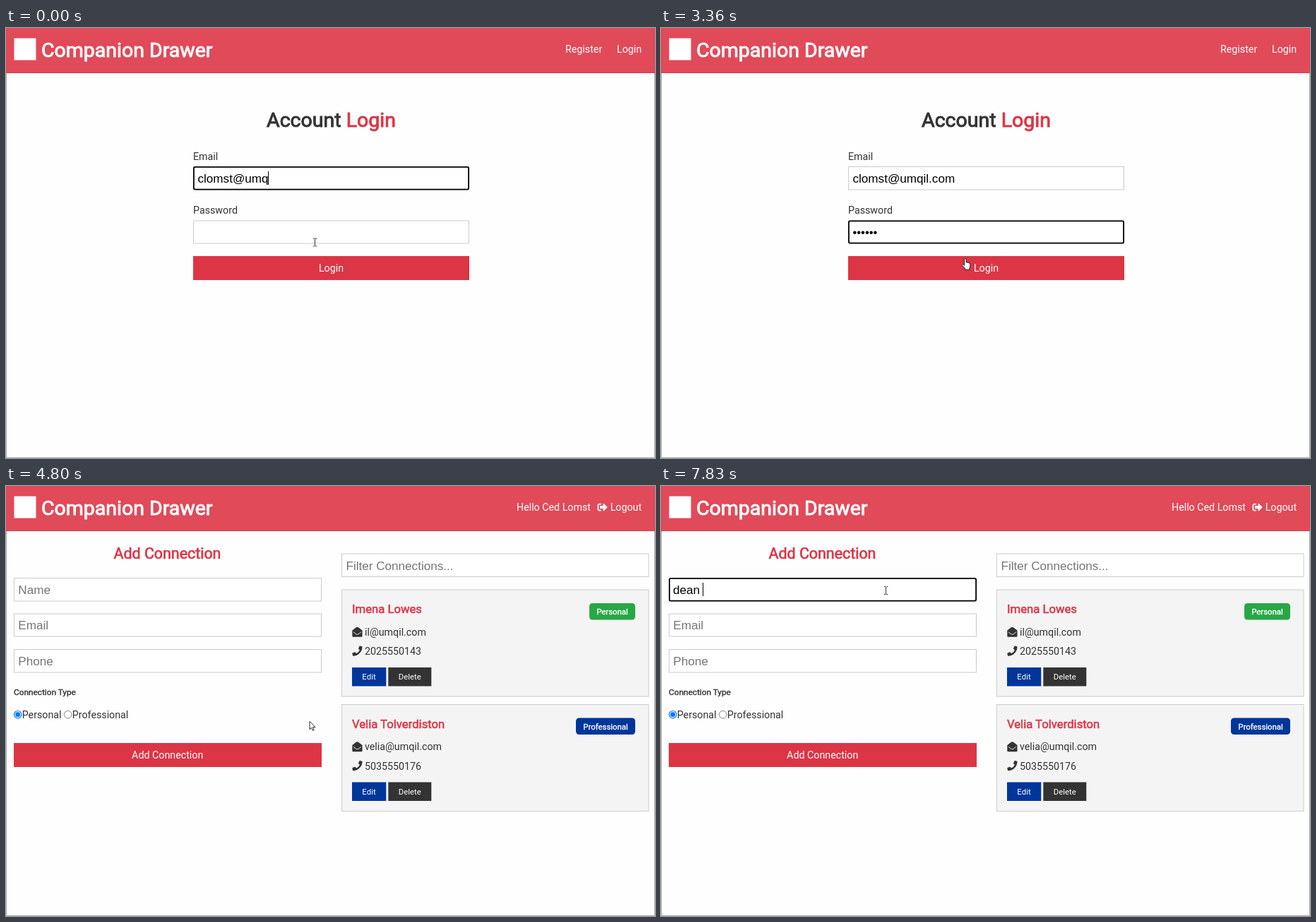
An HTML page that plays this animation: 919x609 px, repeating every 8 s.

```html
<!DOCTYPE html>
<html lang="en">
<head>
<meta charset="utf-8">
<title>Companion Drawer</title>
<style>
  html, body { margin: 0; width: 100%; height: 100%; overflow: hidden; background: #fefefe; }
  svg { display: block; width: 919px; height: 609px; }
  text { font: 14.25px Roboto, sans-serif; fill: currentColor; color: #333; white-space: pre; }
  .white { color: #fff; }
  .red { color: #dc3545; }
  .mid { text-anchor: middle; }
  .end { text-anchor: end; }
  .bold { stroke: currentColor; stroke-width: .033em; }
  .h1 { font-size: 28.5px; }
  .h2 { font-size: 21.4px; }
  .h3 { font-size: 16.7px; }
  .h5 { font-size: 11.83px; }
  .small { font-size: 11.4px; }
  .input { font: 17.1px "Liberation Sans", Arial, sans-serif; color: #000; }
  .hint { color: #757575; }
  .dots { font-size: 16.6px; }
  .cursor { fill: #fff; stroke: #111; stroke-width: .9; stroke-linejoin: round; }
</style>
</head>
<body>
<svg viewBox="0 0 919 609">
  <defs>
    <path id="phone" d="M493.4 24.6l-104-24c-11.3-2.6-22.9 3.3-27.5 13.9l-48 112c-4.2 9.8-1.4 21.3 6.9 28l60.6 49.6c-36 76.7-98.9 140.5-177.2 177.2l-49.6-60.6c-6.8-8.3-18.2-11.1-28-6.9l-112 48C3.9 366.5-2 378.1.6 389.4l24 104C27.1 504.2 36.7 512 48 512c256.1 0 464-207.5 464-464 0-11.2-7.7-20.9-18.6-23.4z"/>
    <g id="mail">
      <path d="M0 5.6Q0 5 .6 4.5L5.2 1Q7.1-.6 9 1l4.6 3.5q.6.5.6 1.1V13q0 1.2-1.2 1.2H1.2Q0 14.2 0 13z"/>
      <path d="M1.6 7.3l4 3q1.5 1 3 0l4-3" fill="none" stroke="#f4f4f4" stroke-width=".9"/>
    </g>
  </defs>

  <rect width="919" height="609" fill="#fefefe"/>
  <path d="M.5 64V608.5H918.5V64" fill="none" stroke="#a9a9a9"/>
  <rect width="919" height="64" fill="#e04a59"/>
  <rect y="63" width="919" height="1" fill="#d04654"/>
  <rect x="11.5" y="14.5" width="31" height="31" fill="#fff"/>
  <text class="h1 bold white" x="50" y="40.5">Companion Drawer</text>

  <g id="login">
    <text class="white" x="792" y="35">Register</text>
    <text class="white" x="865" y="35">Login</text>
    <text class="h1 bold mid" x="460.5" y="140">Account <tspan class="red">Login</tspan></text>
    <text x="265" y="186.5">Email</text>
    <text x="265" y="263">Password</text>
    <g id="loginFields"></g>
    <text class="input" id="email" x="271.5" y="219"></text>
    <text class="input dots" id="password" x="271.5" y="295"></text>
    <rect id="loginButton" x="265" y="323" width="391" height="34"/>
    <text class="white mid" x="460.5" y="345">Login</text>
  </g>

  <g id="home">
    <text class="white end" id="hello" x="828" y="35"></text>
    <path fill="#fff" transform="translate(837.5 23) scale(.0278)" d="M497 273L329 441c-15 15-41 4.5-41-17v-96H152c-13.3 0-24-10.7-24-24v-96c0-13.3 10.7-24 24-24h136V88c0-21.4 25.9-32 41-17l168 168c9.3 9.4 9.3 24.6 0 34zM192 436v-40c0-6.6-5.4-12-12-12H96c-17.7 0-32-14.3-32-32V160c0-17.7 14.3-32 32-32h84c6.6 0 12-5.4 12-12V76c0-6.6-5.4-12-12-12H96c-53 0-96 43-96 96v192c0 53 43 96 96 96h84c6.6 0 12-5.4 12-12z"/>
    <text class="white" x="855.7" y="35">Logout</text>
    <text class="h2 bold red mid" x="228.5" y="103">Add Connection</text>
    <g id="homeFields"></g>
    <text class="input hint" id="nameHint" x="17.3" y="153">Name</text>
    <text class="input" id="name" x="17" y="153"></text>
    <text class="input hint" x="17.3" y="203">Email</text>
    <text class="input hint" x="17.3" y="254">Phone</text>
    <text class="input hint" x="481.5" y="118.5">Filter Connections...</text>
    <text class="h5 bold" x="11" y="296">Connection Type</text>
    <circle cx="16.7" cy="323.7" r="5.2" fill="#fff" stroke="#0075ff" stroke-width="1.2"/>
    <circle cx="16.7" cy="323.7" r="3.4" fill="#0075ff"/>
    <text x="22.7" y="329">Personal</text>
    <circle cx="87.6" cy="323.7" r="5.3" fill="#fff" stroke="#767676" stroke-width=".9"/>
    <text x="93.8" y="329">Professional</text>
    <rect x="11" y="364" width="436" height="34" fill="#dc3545"/>
    <text class="white mid" x="228.7" y="386">Add Connection</text>
    <g id="spinner" transform="translate(692.7 236.5)"></g>
    <g id="cards"></g>
  </g>

  <rect id="ring" fill="none" stroke="#000" stroke-width="1.8" rx="2"/>
  <rect id="caret" width="1" height="19"/>
  <path id="beam" fill="none" stroke="#333" d="M-2.5-5.5h2M.5-5.5h2M0-5V5M-2.5 5.5h2M.5 5.5h2"/>
  <path id="hand" class="cursor" d="M4 10.5V1.8a1.3 1.3 0 0 1 2.6 0V6q1.3-.7 2 .4 1.2-.5 1.9.5 1.5-.4 1.8 1V11q0 2-1 3.2v2H5.2v-1.4L1.2 10.4Q.6 9 1.9 8.6q.9-.2 2.1 1.9z"/>
  <path id="arrow" class="cursor" d="M0 0V11.5L2.6 9 4.4 13 6.2 12.2 4.4 8.3H8z"/>
</svg>

<script>
const LOOP = 8000;
const $ = id => document.getElementById(id);
const show = (el, on) => { el.style.display = on ? '' : 'none'; };

const field = (x, y, w, h) =>
  `<rect x="${x + .5}" y="${y + .5}" width="${w - 1}" height="${h - 1}" fill="#fff" stroke="#ccc"/>`;

const card = (y, name, mail, phone, type, badgeX, color) => `
  <g transform="translate(0 ${y})">
    <rect x="475.5" y=".5" width="434.5" height="151" fill="#f4f4f4" stroke="#ccc"/>
    <text class="h3 bold red" x="490" y="33.5">${name}</text>
    <rect x="${badgeX}" y="19.5" width="${891 - badgeX}" height="23.5" rx="4.5" fill="${color}"/>
    <text class="small bold white mid" x="${(891 + badgeX) / 2}" y="35.5">${type}</text>
    <use href="#mail" x="490.3" y="53" fill="#333"/>
    <text x="508" y="65">${mail}</text>
    <use href="#phone" transform="translate(490.3 80) scale(.0278)" fill="#333"/>
    <text x="508" y="92.5">${phone}</text>
    <rect x="490" y="110.5" width="48.3" height="26.5" fill="#003699"/>
    <text class="small white mid" x="514" y="127.7">Edit</text>
    <rect x="541.3" y="110.5" width="61" height="26.5" fill="#333"/>
    <text class="small white mid" x="571.8" y="127.7">Delete</text>
  </g>`;

const boxes = {
  email: [265, 196, 391, 33.5],
  password: [265, 272.5, 391, 33],
  name: [11, 130, 436, 33.5]
};

$('loginFields').innerHTML = field(...boxes.email) + field(...boxes.password);
$('homeFields').innerHTML = field(...boxes.name) + field(11, 180.5, 436, 33) +
  field(11, 231, 436, 33.5) + field(475, 95.5, 435.5, 33.5);
$('cards').innerHTML =
  card(146.5, 'Imena Lowes', 'il@umqil.com', '2025550143', 'Personal', 826, '#28a745') +
  card(309, 'Velia Tolverdiston', 'velia@umqil.com', '5035550176', 'Professional', 807, '#003699');
$('spinner').innerHTML = Array.from({ length: 12 }, (_, i) =>
  `<path d="M11 0H20.5" stroke-width="3.8" transform="rotate(${i * 30})"/>`).join('');

// Each track lists [start time, value]; a value holds until the next start.
const typed = {
  email: [[0, 10], [150, 11], [280, 12], [580, 13], [850, 14], [980, 15], [1130, 16]],
  password: [[0, 0], [1740, 2], [1890, 3], [2190, 4], [2320, 5], [2620, 6]],
  name: [[0, 0], [6810, 2], [6940, 3], [7090, 4], [7830, 5]]
};
const words = { email: 'cdrosh@umqil.com', password: '••••••', name: 'dean ' };
words.email = 'clomst@umqil.com';
const focus = [[0, 'email'], [1130, 'password'], [3780, ''], [5500, 'name']];
const caretOn = [[0, 1], [3060, 0], [5500, 1], [6070, 0], [6660, 1], [7680, 0], [7830, 1]];
const pointer = [
  [0, ['beam', 437.5, 303.5]], [3360, ['hand', 425.5, 326]], [3510, ['hand', 425.5, 333]],
  [4550, ['arrow', 430, 333.3]], [4950, ['arrow', 403.8, 266.5]], [5100, ['arrow', 352, 216]],
  [5220, ['arrow', 324.5, 163.5]], [5370, ['beam', 318.5, 148]]
];
const shades = ['#000', '#222', '#666', '#aaa'];

const at = (track, t) => track.filter(([start]) => start <= t).pop()[1];

function draw(t) {
  const home = t >= 4550;
  const loaded = t >= 4800;
  show($('login'), !home);
  show($('home'), home);
  show($('spinner'), !loaded);
  show($('cards'), loaded);
  $('hello').textContent = t >= 4670 ? 'Hello Ced Lomst' : 'Hello';
  $('loginButton').setAttribute('fill', t >= 3510 ? '#e55e6c' : '#dc3545');

  for (const id in typed) {
    const value = words[id].slice(0, at(typed[id], t));
    if ($(id).textContent !== value) $(id).textContent = value;
  }
  show($('nameHint'), !$('name').textContent);

  const head = 1 + Math.floor(Math.max(0, t - 4550) / 83.3);
  [...$('spinner').children].forEach((spoke, i) =>
    spoke.setAttribute('stroke', shades[(head - i + 120) % 12] || '#ccc'));

  const active = at(focus, t);
  show($('ring'), active);
  show($('caret'), active && at(caretOn, t));
  if (active) {
    const [x, y, w, h] = boxes[active];
    const ring = { x: x + .9, y: y + .9, width: w - 1.8, height: h - 1.8,
      opacity: t >= 3660 && t < 3780 ? .5 : 1 };
    for (const key in ring) $('ring').setAttribute(key, ring[key]);
    const input = $(active);
    const length = input.textContent ? input.getComputedTextLength() : 0;
    $('caret').setAttribute('x', Math.floor(+input.getAttribute('x') + length));
    $('caret').setAttribute('width', length ? 1 : 1.6);
    $('caret').setAttribute('y', Math.round(y + 7));
  }

  const [shape, px, py] = at(pointer, t);
  for (const id of ['beam', 'hand', 'arrow']) show($(id), id === shape);
  $(shape).setAttribute('transform', `translate(${px} ${py})`);
}

const start = performance.now();
function tick() {
  draw((performance.now() - start) % LOOP);
  requestAnimationFrame(tick);
}
tick();
</script>
</body>
</html>
```
